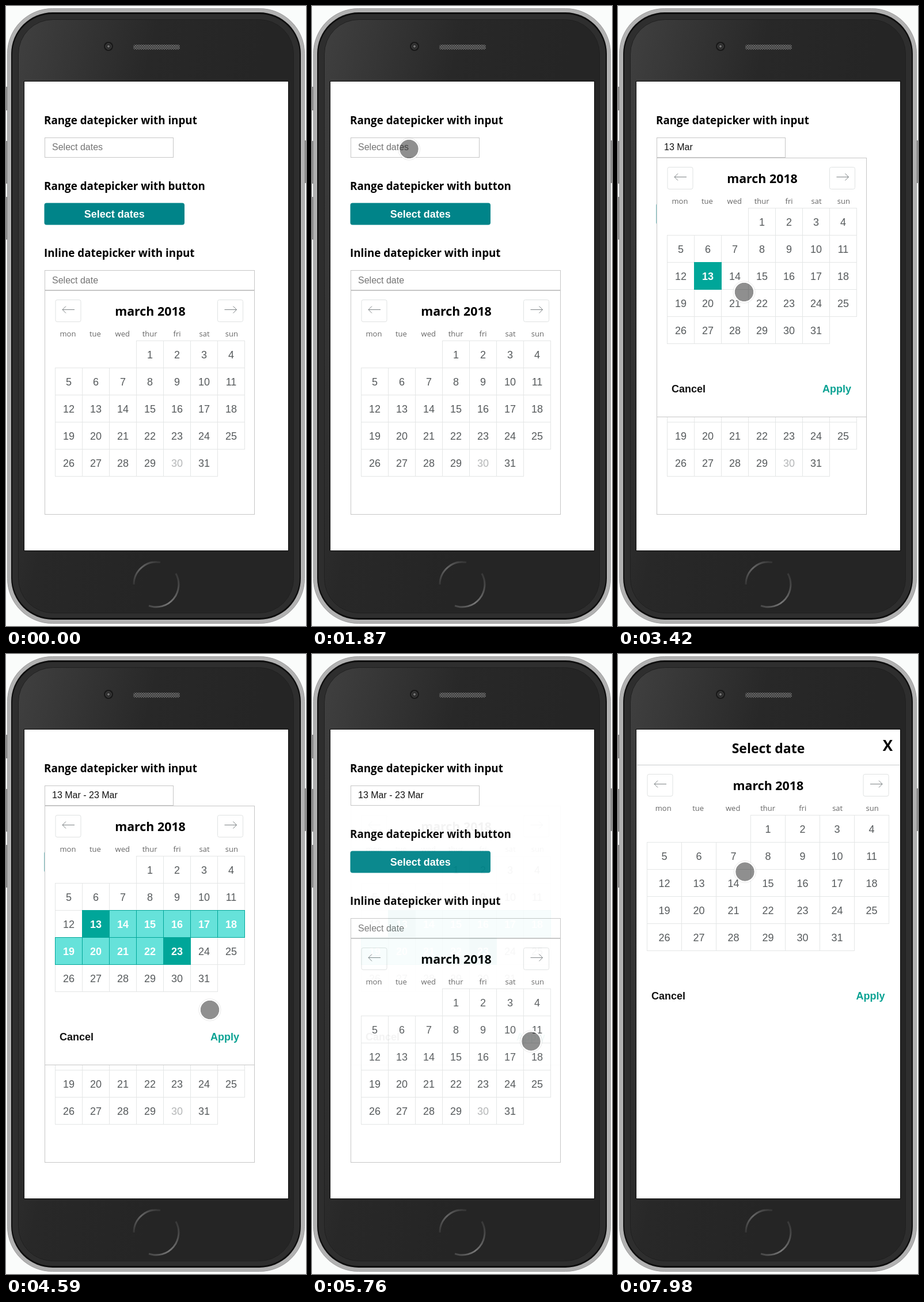
Animation of 521x1075 px, one loop 8000 ms. Source, as an HTML page:

```html
<!DOCTYPE html>
<html lang="en">
<head>
<meta charset="utf-8">
<title>Range datepicker</title>
<style>
  html, body { margin: 0; width: 100%; height: 100%; overflow: hidden; background: #fafcfb; }
  svg { display: block; width: 521px; height: 1075px; }
  text { font-family: Arial, "Liberation Sans", sans-serif; }
  .h, .month, .title, .close { font-family: "Open Sans", "Noto Sans", sans-serif; font-weight: 700; fill: #000; }
  .h { font-size: 18.8px; }
  .month { font-size: 21.4px; }
  .title { font-size: 23px; }
  .close { font-size: 26px; }
  .week { font: 13px "Open Sans", "Noto Sans", sans-serif; fill: #666; }
  .field { font-size: 16px; fill: #757575; }
  .field.set { fill: #111; }
  .bold { font-size: 18px; font-weight: 700; fill: #111; }
  .apply { fill: #0aa293; }
  .mid { text-anchor: middle; }
  .end { text-anchor: end; }
  .box { fill: #fff; stroke: #c6c6c6; }
  .nav { fill: #fff; stroke: #dfe2e2; }
  .arrow { fill: none; stroke: #7d8385; }
  .day rect { fill: #fff; stroke: #e4e6e6; }
  .day text { font-size: 18px; fill: #565a5c; text-anchor: middle; }
  .day.off text { fill: #b4b6b7; }
  .day.range rect { fill: #66e2da; stroke: #00a699; }
  .day.edge rect { fill: #00a699; stroke: #00a699; }
  .day.range text, .day.edge text { fill: #fff; font-weight: 700; }
</style>
</head>
<body>
<svg viewBox="0 0 521 1075" xmlns="http://www.w3.org/2000/svg">
  <defs>
    <linearGradient id="glass" x1="0" y1="0" x2=".75" y2=".36">
      <stop offset="0" stop-color="#404040"/>
      <stop offset=".55" stop-color="#282828"/>
      <stop offset="1" stop-color="#252525"/>
    </linearGradient>
    <linearGradient id="arcTop" x1="0" y1="1" x2="1" y2="0">
      <stop offset="0" stop-color="#363636"/>
      <stop offset=".5" stop-color="#666"/>
      <stop offset="1" stop-color="#333"/>
    </linearGradient>
    <linearGradient id="arcLow" x1="1" y1="0" x2="0" y2="1">
      <stop offset="0" stop-color="#333"/>
      <stop offset=".6" stop-color="#787878"/>
      <stop offset="1" stop-color="#444"/>
    </linearGradient>
    <pattern id="mesh" width="4" height="4" patternUnits="userSpaceOnUse">
      <rect width="4" height="4" fill="#333"/>
      <path d="M0 0h2v2h-2zM2 2h2v2h-2z" fill="#707070"/>
    </pattern>
    <clipPath id="screen"><rect x="32" y="131" width="458" height="813"/></clipPath>
  </defs>

  <g fill="#8d8d8d">
    <rect y="140" width="4" height="41"/>
    <rect y="234" width="4" height="74"/>
    <rect y="331" width="4" height="74"/>
    <rect x="517" y="233" width="4" height="74"/>
  </g>
  <rect x="2.5" y="4.5" width="516" height="1066" rx="78" fill="#b1b1b1" stroke="#9a9a9a"/>
  <rect x="9" y="11" width="503" height="1053" rx="72" fill="#0e0e0e"/>
  <rect x="11" y="14" width="499" height="1047" rx="70" fill="#2e2e2e"/>
  <rect x="21.5" y="23.5" width="478" height="1029" rx="60" fill="url(#glass)" stroke="#202020"/>
  <circle cx="178" cy="70" r="8" fill="#191919"/>
  <circle cx="178" cy="70" r="5" fill="#2b2b2b" stroke="#4a4a4a"/>
  <circle cx="178" cy="70" r="2" fill="#777"/>
  <rect x="221" y="67" width="81" height="8.5" rx="4" fill="url(#mesh)"/>
  <g fill="none" stroke-width="3">
    <path d="M222 1003A39 39 0 0 1 268 964.6" stroke="url(#arcTop)"/>
    <path d="M295 984A39 39 0 0 1 248 1039.8" stroke="url(#arcLow)"/>
  </g>
  <rect x="31" y="130" width="460" height="815" fill="#080808"/>

  <g clip-path="url(#screen)">
    <rect x="32" y="131" width="458" height="813" fill="#fff"/>
    <text class="h" x="66" y="205">Range datepicker with input</text>
    <rect class="box" x="67.5" y="228.5" width="223" height="34"/>
    <text class="field" id="dates" x="80" y="250.3">Select dates</text>
    <text class="h" x="66" y="319">Range datepicker with button</text>
    <rect x="66.5" y="341.5" width="243.5" height="38" rx="4" fill="#008489"/>
    <text class="bold mid" x="188.3" y="366.5" style="fill:#fff">Select dates</text>
    <rect id="focus" x="66.5" y="341.5" width="244" height="38" rx="1" fill="none" stroke="#e59f2c" stroke-width="1.5"/>
    <text class="h" x="66" y="435">Inline datepicker with input</text>
    <rect class="box" x="67.5" y="458.5" width="364" height="34"/>
    <text class="field" x="80" y="480.5">Select date</text>
    <rect class="box" x="67.5" y="493.5" width="364" height="388"/>
    <g id="inline"></g>

    <g id="popup">
      <rect class="box" x="67.5" y="263.5" width="364" height="449"/>
      <text class="bold" x="93" y="670">Cancel</text>
      <text class="bold apply end" x="405" y="670">Apply</text>
    </g>

    <g id="modal">
      <rect x="32" y="131" width="458" height="813" fill="#fff"/>
      <path d="M33 192.5H489" stroke="#cacccd"/>
      <text class="title mid" x="261" y="171.5">Select date</text>
      <text class="close mid" x="468.5" y="168">X</text>
      <text class="bold" x="58" y="598.6">Cancel</text>
      <text class="bold apply end" x="463.5" y="598.6">Apply</text>
    </g>
  </g>

  <g id="cursor">
    <circle r="16.4" fill="#000" fill-opacity=".44"/>
    <circle r="17.5" fill="none" stroke="#fff" stroke-width="2.4"/>
    <circle r="19" fill="none" stroke="#000" stroke-opacity=".13" stroke-width=".7"/>
  </g>
</svg>
<script>
const $ = id => document.getElementById(id);
const LOOP = 8000, START = 470, TICK = 77.4;
const ROW = 47.1;

// Month grid with its top-left corner at (x, y) and columns of width w.
function calendar(host, { x, y, w, week, weekStep, next, disabled }) {
  const mid = x + 3.5 * w;
  const nav = (nx, dir) => {
    const cx = nx + 22.5, ay = y - 54, tip = cx + dir * 10.5;
    return `<rect class="nav" x="${nx}" y="${y - 71}" width="44" height="38" rx="3"/>
      <path class="arrow" d="M${cx - 10.5} ${ay}h21M${tip - dir * 6} ${ay - 6}L${tip} ${ay}L${tip - dir * 6} ${ay + 6}"/>`;
  };
  let html = nav(x + .5, -1) + nav(next, 1) +
    `<text class="month mid" x="${mid + .5}" y="${y - 44}">march 2018</text>`;
  ['mon', 'tue', 'wed', 'thur', 'fri', 'sat', 'sun'].forEach((name, i) => {
    html += `<text class="week mid" x="${week + i * weekStep}" y="${y - 7.2}">${name}</text>`;
  });
  html += '<g>';
  const snap = v => Math.round(v - .5) + .5;
  for (let d = 1; d <= 31; d++) {
    const slot = d + 2, col = slot % 7;
    const left = snap(x + col * w), right = snap(x + (col + 1) * w);
    const top = snap(y + Math.floor(slot / 7) * ROW);
    html += `<g class="day${d === disabled ? ' off' : ''}">
      <rect x="${left}" y="${top}" width="${right - left}" height="47"/>
      <text x="${(left + right) / 2}" y="${top + 30.5}">${d}</text></g>`;
  }
  host.insertAdjacentHTML('beforeend', html + '</g>');
  return [...host.querySelectorAll('.day')];
}

const small = { x: 85.5, y: 350.5, w: 47, week: 107.5, weekStep: 47.4, next: 367.5 };
const large = { x: 50.5, y: 279.5, w: 59.95, week: 78.7, weekStep: 60.5, next: 426 };
calendar($('inline'), { ...small, y: 580.5, disabled: 30 });
const days = calendar($('popup'), small);
calendar($('modal'), large);

// Pointer path: tick, x, y
const path = [
  [0, 410, 1060], [2, 355, 850], [4, 265, 540], [6, 190, 310], [8, 158, 214], [10, 162, 234],
  [11, 162, 234], [15, 168.5, 248], [18, 168.5, 248], [19, 166, 256], [22, 128, 386],
  [23, 128, 386], [29, 158, 475], [30, 159, 474], [33, 168, 474], [35, 168, 474],
  [38, 219, 496], [40, 262, 541], [41, 264, 541], [43, 272, 546], [46, 301, 524], [47, 301, 524],
  [53, 354, 617], [58, 368, 681], [60, 380, 675], [62, 380, 674], [63, 380.5, 671.5], [70, 380.5, 671.5],
  [73, 310, 590], [75, 200, 450], [77, 120, 355], [78, 108, 343], [80, 121, 362], [91, 121, 362],
  [93, 185, 300], [94, 240, 272], [95, 264, 290], [96, 245, 345], [97, 220.5, 377.5]
];

function pointer(k) {
  const i = path.findIndex(p => p[0] >= k);
  if (i < 0) return path[path.length - 1].slice(1);
  if (i === 0) return path[0].slice(1);
  const [a, ax, ay] = path[i - 1], [b, bx, by] = path[i];
  const f = (k - a) / (b - a);
  return [ax + (bx - ax) * f, ay + (by - ay) * f];
}

function ease(k, from, span) {
  const f = Math.min(1, Math.max(0, (k - from) / span));
  return f * f * (3 - 2 * f);
}

function fade(el, opacity) {
  el.style.opacity = opacity;
  el.style.visibility = opacity > 0 ? 'visible' : 'hidden';
}

let last = -1;
function choose(stage) {
  if (stage === last) return;
  last = stage;
  $('dates').textContent = ['Select dates', '13 Mar', '13 Mar - 23 Mar'][stage];
  $('dates').setAttribute('class', stage ? 'field set' : 'field');
  const end = [0, 13, 23][stage];
  days.forEach((el, i) => {
    const d = i + 1, inside = d >= 13 && d <= end;
    el.setAttribute('class', !inside ? 'day' : d === 13 || d === end ? 'day edge' : 'day range');
    if (inside) el.parentNode.append(el);
  });
}

function draw() {
  const k = Math.floor((performance.now() % LOOP - START) / TICK);
  const [x, y] = pointer(k);
  $('cursor').setAttribute('transform', `translate(${x} ${y})`);
  $('cursor').style.visibility = k < 0 ? 'hidden' : 'visible';
  choose(k < 36 ? 0 : k < 48 ? 1 : 2);
  fade($('popup'), ease(k, 18, 4) - ease(k, 65.3, 3.08));
  fade($('modal'), ease(k, 86.3, 3.7));
  $('focus').style.visibility = k < 87 ? 'hidden' : 'visible';
  requestAnimationFrame(draw);
}
draw();
</script>
</body>
</html>
```
